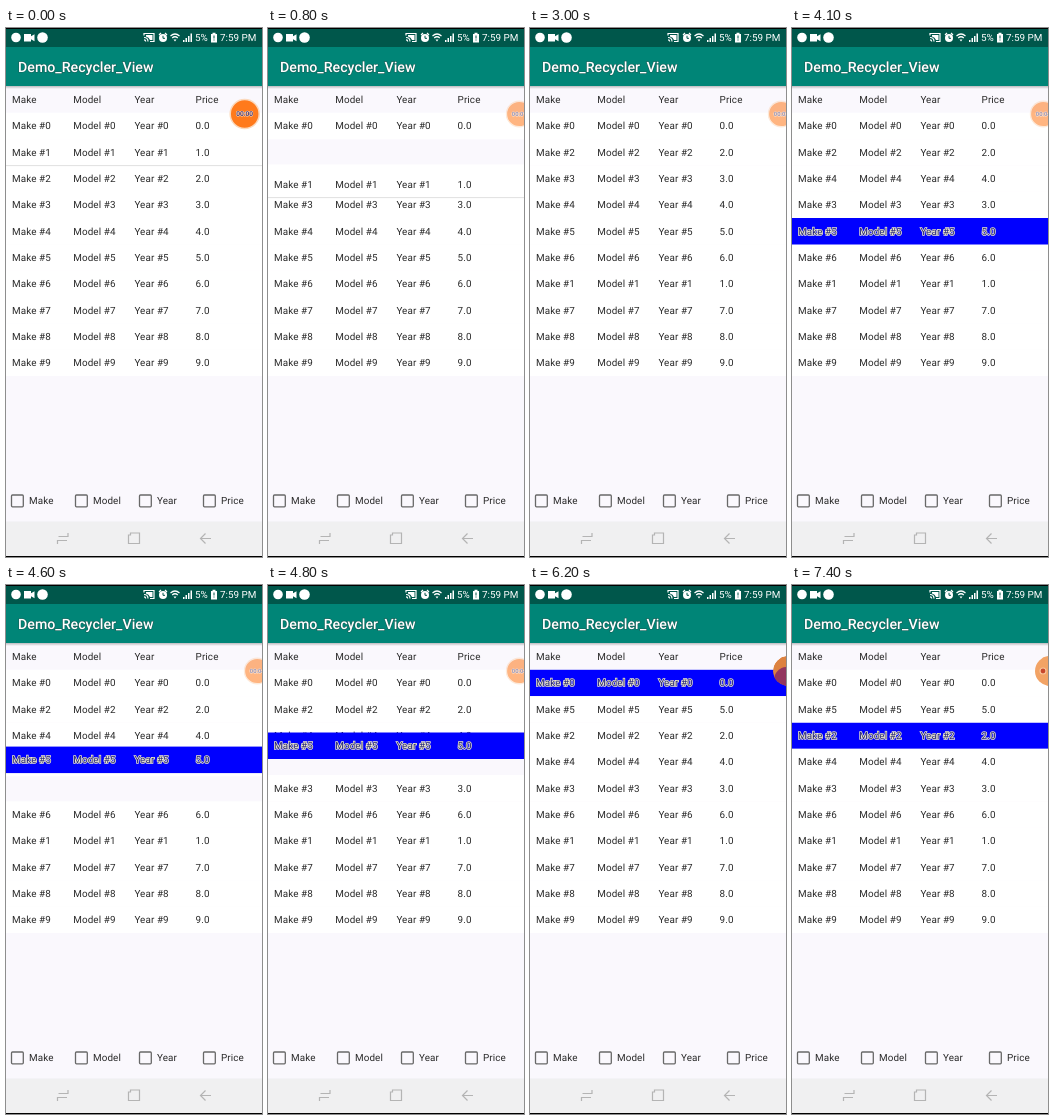
Recreate the animation shown at these times as an HTML page. Size 256 by 529 pixels, loop 8000 ms.

```html
<!DOCTYPE html>
<html lang="en">
<head>
<meta charset="utf-8">
<title>Demo_Recycler_View</title>
<style>
html, body { margin: 0; width: 100%; height: 100%; overflow: hidden; background: #faf8fd; }
svg { display: block; width: 100%; height: 100%; }
text {
  font: 9.9px Roboto, "Noto Sans", sans-serif; fill: #2a2a2a;
  letter-spacing: .1px; text-rendering: geometricPrecision;
}
.bar text { fill: #fff; letter-spacing: 0; }
.bar .title {
  font-size: 14.2px; font-weight: 500;
  stroke: #3a3030; stroke-opacity: .4; stroke-width: 1.2px; paint-order: stroke;
}
.icon { fill: none; stroke: #fff; stroke-width: 1.2; }
.dark { fill: none; stroke: #00574b; stroke-width: 1; }
.solid { fill: #fff; }
.nav { fill: none; stroke: #b4b4b4; stroke-width: 1.2; }
.box { fill: none; stroke: #686868; stroke-width: 1.3; }
.row rect { fill: #fff; }
.row .shade { fill: #e0e0e0; visibility: hidden; }
.row.held .shade { visibility: visible; }
.row.picked .back { fill: #00f; }
.row.picked text { fill: #25257c; stroke: #f4efc8; stroke-width: 1.5px; paint-order: stroke; }
#clock text {
  font-size: 6.6px; font-weight: 500; letter-spacing: 0; text-anchor: middle;
  fill: #34235e; stroke: #fbe3d0; stroke-width: 1px; paint-order: stroke;
}
</style>
</head>
<body>
<svg viewBox="0 0 256 529" preserveAspectRatio="none">
  <defs>
    <linearGradient id="drop" x2="0" y2="1">
      <stop stop-color="#000" stop-opacity=".25"/>
      <stop offset="1" stop-color="#000" stop-opacity="0"/>
    </linearGradient>
    <clipPath id="disc"><circle cx="258" cy="86" r="15"/></clipPath>
  </defs>
  <rect width="256" height="529" fill="#faf8fd"/>
  <g id="head"></g>
  <g id="list"></g>
  <g id="checks"></g>

  <g class="bar">
    <rect y="58" width="256" height="3" fill="url(#drop)"/>
    <rect width="256" height="58" fill="#008577"/>
    <rect width="256" height="19" fill="#00574b"/>
    <rect width="256" height="1"/>
    <text class="title" x="12" y="44">Demo_Recycler_View</text>
    <circle class="solid" cx="10" cy="9.500" r="4.800"/>
    <path class="solid" d="M18 6h7v2.200l3.500-2v7l-3.500-2V13.500h-7z"/>
    <circle class="solid" cx="36.500" cy="9.500" r="5.300"/>
    <path class="icon" d="M138 7.500V5.500h10v8h-4M138 9.500q4 0 4 4M138 11.800q1.700 0 1.700 1.700"/>
    <path class="solid" d="M140 7h6.500v5h-2.500q-1-3-4-3.500z"/>
    <circle class="solid" cx="157" cy="10" r="4"/>
    <path class="dark" d="M157 7.800v2.500h2"/>
    <path class="icon" d="M153 7l2-2M161 7l-2-2"/>
    <path class="icon" d="M164.500 8q4.500-4 9 0M166.200 10q2.800-2.500 5.600 0"/>
    <path class="solid" d="M167.500 11.500h3l-1.500 2z"/>
    <path class="solid" d="M177 14v-2h1.500v2zm2.500 0v-4h1.500v4zm2.500 0V8h1.500v6zm2.500 0V5.500h1.500V14z"/>
    <text x="189" y="13.300">5%</text>
    <path class="solid" d="M205 6h1.500V4.700h3V6h1.500v8.500h-6z"/>
    <path class="dark" d="M208 7.500v3M208 11.500v1"/>
    <text x="214" y="13.300">7:59 PM</text>
  </g>

  <rect y="493.500" width="256" height="35.500" fill="#f0f0f1"/>
  <path class="nav" d="M52.500 508.500H62V505M61 512.500H51.500V516"/>
  <path class="nav" d="M124.500 505h9v10.500h-11V507h2z"/>
  <path class="nav" d="M205 510.500h-10.500M199.500 505.500l-5 5l5 5"/>
  <rect y="528" width="256" height="1"/>

  <g id="clock">
    <circle r="14.500" fill="#ff7a1c" stroke="#fbd9bd" stroke-width="1.500"/>
    <text y="2.400"></text>
  </g>
  <g id="flip" clip-path="url(#disc)">
    <circle cx="258" cy="86" r="15" fill="#dd8240"/>
    <circle cx="257" cy="95" r="13" fill="#93365f"/>
  </g>
  <g id="record">
    <circle cx="258" cy="86" r="15" fill="#f2a365"/>
    <circle cx="251" cy="86" r="3" fill="#c7472c" stroke="#f8c49b" stroke-width="1.200"/>
  </g>
</svg>
<script>
const NS = 'http://www.w3.org/2000/svg';
const LOOP = 8000, STEP = 100, H = 26.3, TOP = 84.8, SHIFT = 200;
const NAMES = ['Make', 'Model', 'Year', 'Price'];
const $ = id => document.getElementById(id);

function add(parent, tag, attrs, label) {
  const el = document.createElementNS(NS, tag);
  for (const k in attrs) el.setAttribute(k, attrs[k]);
  if (label !== undefined) el.textContent = label;
  parent.appendChild(el);
  return el;
}

const colX = i => 6 + 61.2 * i;
NAMES.forEach((name, i) => {
  add($('head'), 'text', { x: colX(i), y: 75.3 }, name);
  add($('checks'), 'rect', { class: 'box', x: 5.5 + 64 * i, y: 467, width: 11.8, height: 11.8, rx: 1 });
  add($('checks'), 'text', { x: 23 + 64 * i, y: 476.4 }, name);
});

const rows = Array.from({ length: 10 }, (_, n) => {
  const g = add($('list'), 'g', { class: 'row' });
  add(g, 'rect', { class: 'back', width: 256, height: H + 0.2 });
  add(g, 'rect', { class: 'shade', y: H - 0.3, width: 256, height: 1 });
  NAMES.forEach((name, i) =>
    add(g, 'text', { x: colX(i), y: 16.7 }, i < 3 ? `${name} #${n}` : n + '.0'));
  return g;
});

// Each drag: order before it, index of the held row, slots moved, offset over time
const drags = [
  { start: 0, end: 1400, order: [0, 1, 2, 3, 4, 5, 6, 7, 8, 9], at: 1, slots: 5,
    keys: [[300, 0], [400, 2], [600, 16], [780, 26.5], [800, 32], [1200, 144], [1300, 149], [1400, 5 * H]] },
  { start: 3200, end: 5100, order: [0, 2, 4, 3, 5, 6, 1, 7, 8, 9], at: 4, slots: -3,
    keys: [[4400, 0], [4500, -16], [4580, -27], [4800, -42.5], [4880, -80], [5000, -84], [5100, -3 * H]] }
];

function offset(keys, t) {
  if (t <= keys[0][0]) return keys[0][1];
  for (let i = 1; i < keys.length; i++) {
    const [a, u] = keys[i - 1], [b, v] = keys[i];
    if (t <= b) return u + (v - u) * (t - a) / (b - a);
  }
  return keys[keys.length - 1][1];
}

// Time at which the held row first passes the given distance
function passTime(keys, dist) {
  for (let i = 1; i < keys.length; i++) {
    const [a, u] = keys[i - 1], [b, v] = keys[i];
    if (Math.abs(v) >= dist)
      return a + (b - a) * (dist - Math.abs(u)) / (Math.abs(v) - Math.abs(u));
  }
}

function ease(p) {
  p = Math.min(1, Math.max(0, p));
  return (1 - Math.cos(Math.PI * p)) / 2;
}

const picked = t => t < 3200 ? -1 : t < 6200 ? 5 : t < 7200 ? 0 : 2;

function drawRows(t) {
  const d = t < drags[1].start ? drags[0] : drags[1];
  const dir = Math.sign(d.slots);
  d.order.forEach((n, i) => {
    const k = (i - d.at) * dir;
    let y = TOP + i * H;
    if (k === 0) y += offset(d.keys, t);
    else if (k > 0 && k <= Math.abs(d.slots))
      y -= dir * H * ease((t - passTime(d.keys, k * H)) / SHIFT);
    const held = k === 0 && t < d.end && n !== picked(t);
    rows[n].setAttribute('transform', `translate(0 ${y.toFixed(2)})`);
    rows[n].setAttribute('class', 'row' + (held ? ' held' : '') + (n === picked(t) ? ' picked' : ''));
  });
  const top = rows[d.order[d.at]];
  if ($('list').lastChild !== top) $('list').appendChild(top);
}

function drawBubble(t) {
  const p = ease((t - 300) / 400);
  const clock = $('clock');
  clock.setAttribute('transform', `translate(${238.7 + 12.5 * p} 86) scale(${1 - 0.12 * p})`);
  clock.setAttribute('opacity', 1 - 0.45 * p);
  const secs = [100, 1100, 3000, 4100, 5100].filter(s => t >= s).length;
  clock.lastElementChild.textContent = '00:0' + secs;
  const show = (id, on) => $(id).style.display = on ? '' : 'none';
  show('clock', t < 6200);
  show('flip', t >= 6200 && t < 6400);
  show('record', t >= 6400);
}

function frame(now) {
  const t = Math.floor(now % LOOP / STEP) * STEP;
  drawRows(t);
  drawBubble(t);
  requestAnimationFrame(frame);
}
frame(0);
</script>
</body>
</html>
```
